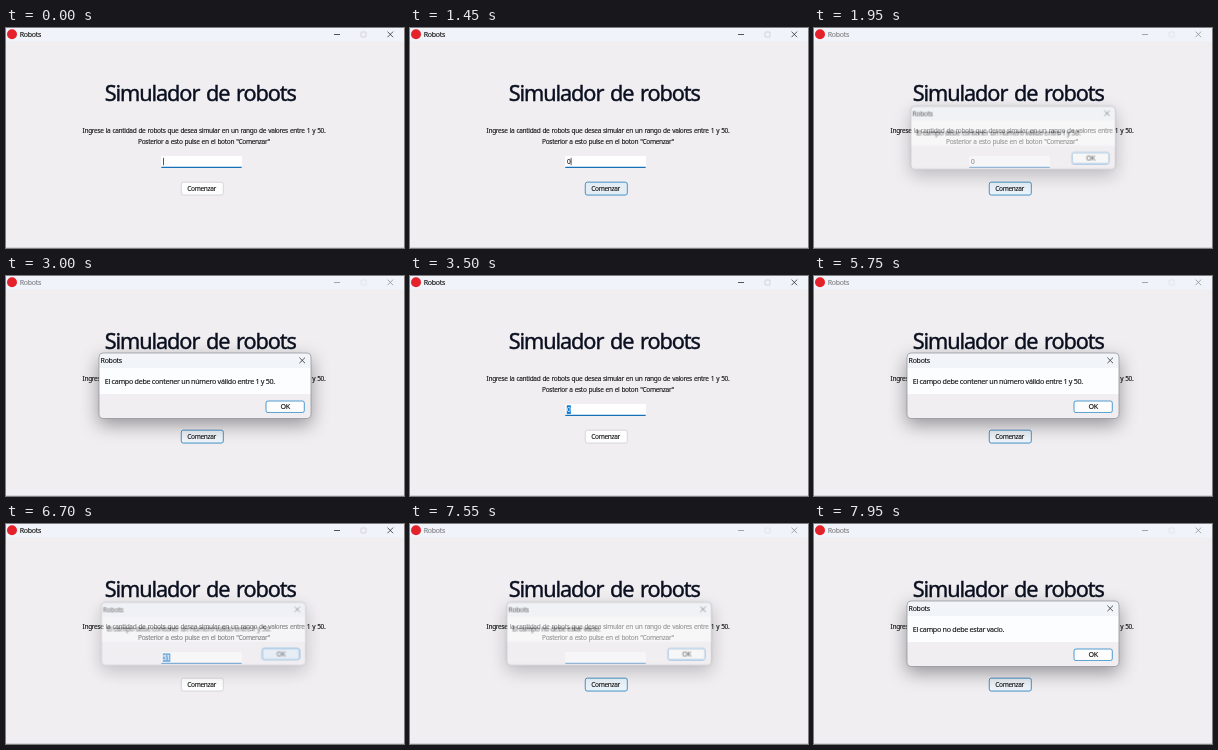
An HTML page that plays this animation: 398x220 px, repeating every 8 s.

```html
<!DOCTYPE html>
<html lang="es">
<head>
<meta charset="utf-8">
<title>Robots</title>
<style>
html, body { margin: 0; width: 100%; height: 100%; overflow: hidden; background: #f0eef1; }
svg { display: block; width: 398px; height: 220px; }
text {
  font: 6.55px "Noto Sans", "Open Sans", sans-serif;
  letter-spacing: -.05em;
  word-spacing: .1em;
  fill: #111;
  stroke: #111;
  stroke-width: .018em;
}
.mid { text-anchor: middle; }
.heading { font-size: 21.7px; fill: #0b1020; stroke: #0b1020; }
.ui { font-size: 7.15px; letter-spacing: -.04em; word-spacing: 0; }
.title { font-size: 7px; letter-spacing: -.04em; }
.line { fill: none; stroke: #2c2c2c; stroke-width: .8; }
.box { fill: #fdfdfd; stroke: #cfcdd1; stroke-width: .8; }
.hot { stroke: #2583c6; stroke-width: .8; }

/* One shared 8 s clock */
.bar, .hover, .typed, .sel, .caret, .dialog, .okhover, .msg { animation: 8s linear infinite; }
.bar, .typed, .sel, .caret, .msg { animation-timing-function: step-end; }

.bar { animation-name: bar; }
@keyframes bar {
  0%, 38.125%, 82.5% { opacity: 1; }
  22.5%, 67.5%, 92.5%, 100% { opacity: .5; }
}

.hover { animation-name: hover; }
@keyframes hover {
  0%, 11.875% { opacity: 0; fill: #e5edf4; }
  14.375%, 21.875% { opacity: 1; fill: #e5edf4; }
  22.5% { fill: #d9eaf7; }
  25%, 38.125% { opacity: 1; fill: #eef4f9; }
  39.375%, 60% { opacity: 0; fill: #e5edf4; }
  62.5%, 66.875% { opacity: 1; fill: #e5edf4; }
  67.5%, 68.75% { fill: #dcebf8; }
  71.25%, 82.5% { opacity: 1; fill: #eef4f9; }
  83.1%, 88.125% { opacity: 0; fill: #e5edf4; }
  90.625%, 91.875% { opacity: 1; fill: #e5edf4; }
  92.5% { fill: #d9eaf7; }
  95%, 100% { opacity: 1; fill: #eef4f9; }
}

.zero { animation-name: zero; }
@keyframes zero { 0%, 54.375%, 100% { opacity: 0; } 5.625% { opacity: 1; } }
.five { animation-name: five; }
@keyframes five { 0%, 86.875%, 100% { opacity: 0; } 54.375% { opacity: 1; } }
.one { animation-name: one; }
@keyframes one { 0%, 86.875%, 100% { opacity: 0; } 58.125% { opacity: 1; } }

.sel rect { fill: #0878d4; }
.sel text { fill: #fff; stroke: #fff; }
.selZero { animation-name: selZero; }
@keyframes selZero { 0%, 54.375%, 100% { opacity: 0; } 38.125% { opacity: 1; } }
.selBoth { animation-name: selBoth; }
@keyframes selBoth { 0%, 86.875%, 100% { opacity: 0; } 82.5% { opacity: 1; } }

.caret { animation-name: caret; }
@keyframes caret {
  0% { opacity: 1; transform: none; }
  5.625%, 18.125% { opacity: 1; transform: translateX(3.6px); }
  11.875%, 22.5% { opacity: 0; transform: translateX(3.6px); }
  54.375% { opacity: 1; transform: translateX(3.6px); }
  58.125% { opacity: 1; transform: translateX(7.2px); }
  64.375% { opacity: 0; transform: translateX(7.2px); }
  86.875% { opacity: 1; transform: none; }
  92.5%, 100% { opacity: 0; transform: none; }
}

.dialog {
  transform-origin: 199px 110px;
  filter: drop-shadow(0 6px 9px rgba(0, 0, 0, .38));
  animation-name: dialog;
}
@keyframes dialog {
  0%, 23.125% { opacity: 0; transform: scale(.92); animation-timing-function: ease-out; }
  26.25%, 38.125% { opacity: 1; transform: none; }
  40.625% { opacity: 0; transform: translateX(-3px) scale(.93); animation-timing-function: step-end; }
  68.75% { opacity: 0; transform: scale(.92); animation-timing-function: ease-out; }
  71.875%, 82.5% { opacity: 1; transform: none; }
  85% { opacity: 0; transform: translateX(-3px) scale(.93); animation-timing-function: step-end; }
  93.125% { opacity: 0; transform: scale(.92); animation-timing-function: ease-out; }
  96.25%, 100% { opacity: 1; transform: none; }
}

.okhover { fill: #dcecf9; animation-name: okhover; }
@keyframes okhover {
  0%, 78.125% { opacity: 0; }
  80%, 85% { opacity: 1; }
  85.1%, 100% { opacity: 0; }
}

.range { animation-name: range; }
@keyframes range { 0% { opacity: 1; } 92.5%, 100% { opacity: 0; } }
.empty { animation-name: empty; }
@keyframes empty { 0% { opacity: 0; } 92.5%, 100% { opacity: 1; } }
</style>
</head>
<body>
<svg viewBox="0 0 398 220">
  <rect width="398" height="220" fill="#f0eef1"/>
  <rect width="398" height="13.5" fill="#f0f4fa"/>
  <path d="M0 219.5H398" stroke="#d4d3d7"/>

  <circle cx="6" cy="6.3" r="5" fill="#e3222b"/>
  <g class="bar">
    <text class="title" x="13.7" y="9.2">Robots</text>
    <path class="line" d="M328 6.5h6M381.5 3.6l5.6 5.6m0-5.6l-5.6 5.6"/>
    <rect class="line" x="355" y="4" width="5" height="5" rx=".6" style="stroke:#c9c9ce"/>
  </g>

  <text class="mid heading" x="194.3" y="73.1">Simulador de robots</text>
  <text class="mid" x="198" y="104.6">Ingrese la cantidad de robots que desea simular en un rango de valores entre 1 y 50.</text>
  <text class="mid" x="198" y="115.8">Posterior a esto pulse en el boton "Comenzar"</text>

  <rect x="155" y="128" width="81" height="12" rx="1.5" fill="#fff"/>
  <path d="M155.3 139.4H235.7" stroke="#1672b8" stroke-width="1.4"/>
  <text class="typed zero" x="157" y="136">0</text>
  <text class="typed five" x="157" y="136">5</text>
  <text class="typed one" x="160.5" y="136">1</text>
  <g class="sel selZero">
    <rect x="156.8" y="129.3" width="4" height="8.6"/>
    <text x="157" y="136">0</text>
  </g>
  <g class="sel selBoth">
    <rect x="156.8" y="129.3" width="7.6" height="8.6"/>
    <text x="157" y="136">51</text>
  </g>
  <rect class="caret" x="157" y="129.8" width=".75" height="7.4" fill="#222"/>

  <rect class="box" x="175.3" y="154.2" width="42" height="12.8" rx="2"/>
  <rect class="hover hot" x="175.3" y="154.2" width="42" height="12.8" rx="2"/>
  <text class="mid" x="195.6" y="163.1">Comenzar</text>

  <g class="dialog">
    <rect x="93" y="77" width="212" height="65.5" rx="4" fill="#f0eef1"/>
    <path d="M93 118V81a4 4 0 0 1 4-4H301a4 4 0 0 1 4 4V118Z" fill="#fbfdfe"/>
    <path d="M93 92V81a4 4 0 0 1 4-4H301a4 4 0 0 1 4 4V92Z" fill="#f1f5fa"/>
    <rect x="93" y="77" width="212" height="65.5" rx="4" fill="none" stroke="#8d8d93" stroke-width=".7"/>
    <text class="title" x="94.6" y="87.2">Robots</text>
    <path class="line" d="M293.4 81.6l5.6 5.6m0-5.6l-5.6 5.6"/>
    <text class="ui msg range" x="98.8" y="107.6">El campo debe contener un número válido entre 1 y 50.</text>
    <text class="ui msg empty" x="98.8" y="107.6">El campo no debe estar vacío.</text>
    <rect class="box hot" x="260" y="125" width="38.3" height="11.6" rx="2"/>
    <rect class="okhover hot" x="260" y="125" width="38.3" height="11.6" rx="2"/>
    <text class="mid ui" x="279.2" y="133.4">OK</text>
  </g>
</svg>
</body>
</html>
```
